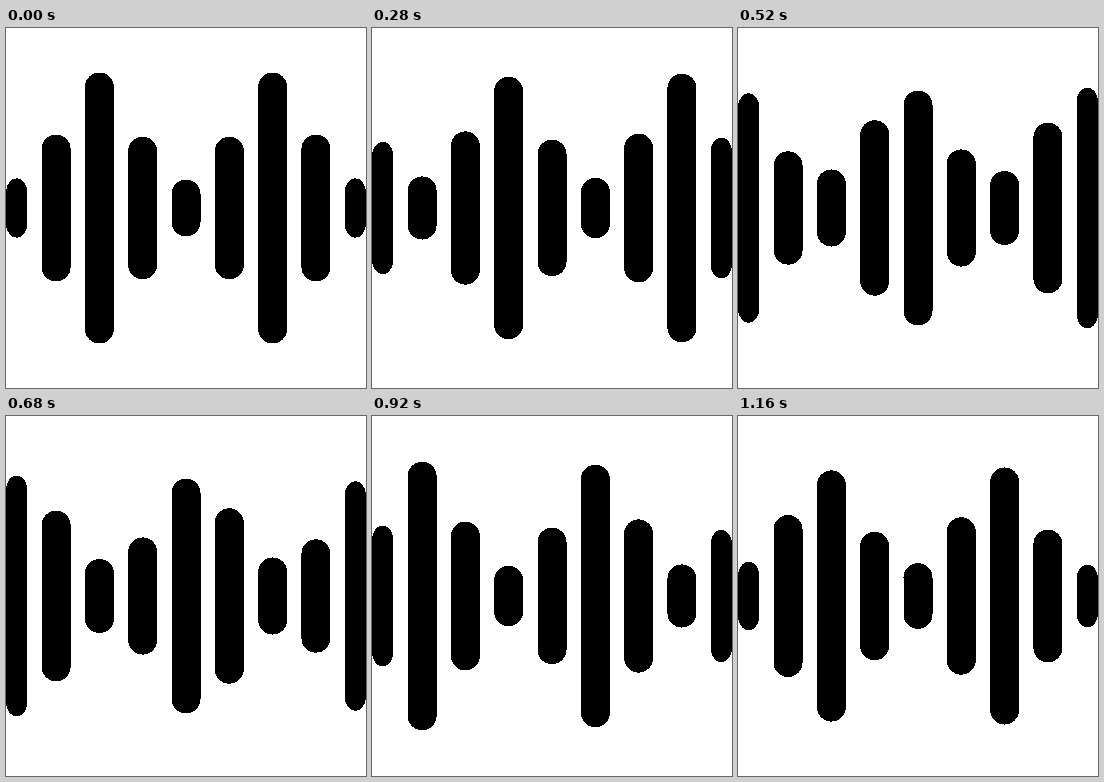
An HTML page that plays this animation: 360x360 px, repeating every 1200 ms.

```html
<!DOCTYPE html>
<html lang="en">
<head>
<meta charset="utf-8">
<title>Sound wave</title>
<style>
  html, body { margin: 0; height: 100%; overflow: hidden; background: #fff; }
  svg { display: block; width: 100vw; height: 100vh; shape-rendering: crispEdges; }
</style>
</head>
<body>
<svg viewBox="0 0 360 360"></svg>
<script>
const SIZE = 360, MID = SIZE / 2, LOOP = 1200, STEP = 40;
const BARS = 9, PITCH = 43.3, WIDTH = 29;
const svg = document.querySelector("svg");

function set(el, attrs) {
  for (const name in attrs) el.setAttribute(name, attrs[name]);
}

// The outermost bars are narrowed to end at the edge of the stage.
const bars = Array.from({ length: BARS }, (_, i) => {
  const center = MID + (i - 4) * PITCH;
  const left = Math.max(0, center - WIDTH / 2);
  const width = Math.min(SIZE, center + WIDTH / 2) - left;
  const bar = document.createElementNS(svg.namespaceURI, "rect");
  set(bar, { x: left, width, rx: width / 2, ry: WIDTH / 2 });
  return svg.appendChild(bar);
});

// Every bar rises and falls alike, about a quarter loop after its neighbour.
function halfHeight(i, t) {
  const peak = 612 + 297 * i;
  const lag = (t - peak + 3 * LOOP) % LOOP;
  const away = Math.min(lag, LOOP - lag) / (LOOP / 2);
  return 137 - 152 * away + 43.3 * away * away;
}

function draw(now) {
  const t = Math.floor(now % LOOP / STEP) * STEP;
  bars.forEach((bar, i) => {
    const h = halfHeight(i, t);
    set(bar, { y: MID - h, height: 2 * h });
  });
}

const start = performance.now();
function tick() {
  draw(performance.now() - start);
  requestAnimationFrame(tick);
}
tick();
</script>
</body>
</html>
```
